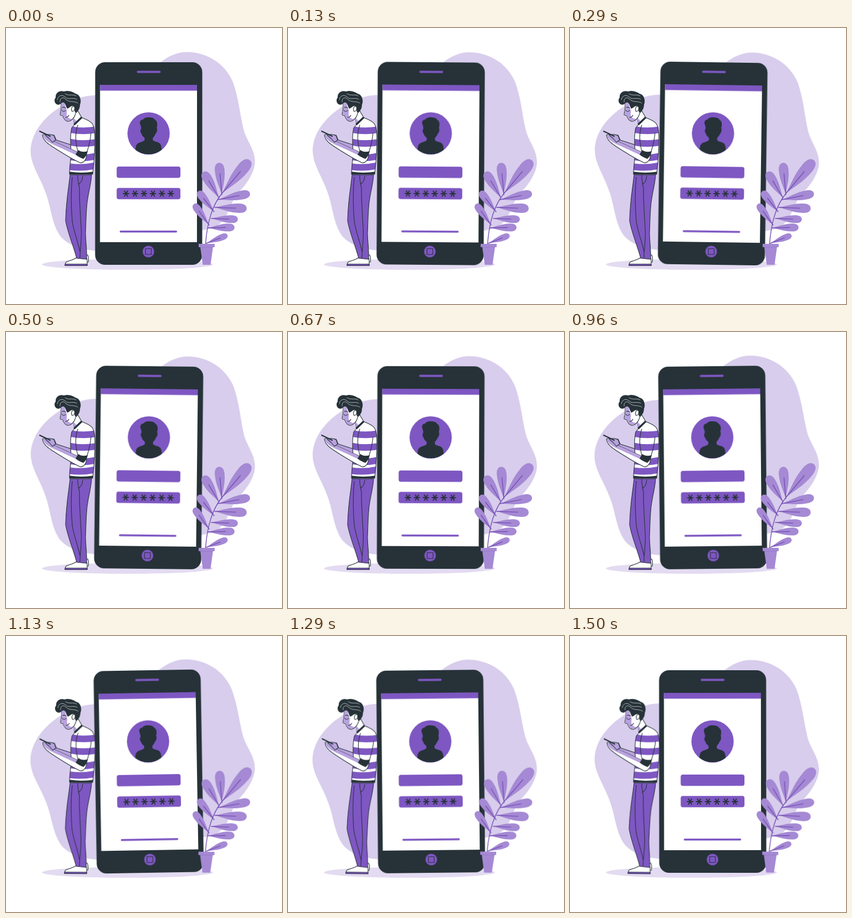
An HTML page without scripts that plays this animation: 500 by 500 pixels, repeating every 1.54 s.

```html
<!DOCTYPE html>
<html lang="en">
<head>
<meta charset="utf-8">
<title>Login illustration</title>
<style>
  html, body { margin: 0; width: 100%; height: 100%; overflow: hidden; background: #fff; }
  svg { display: block; width: 100vw; height: 100vh; }

  .sway { transform-origin: 258.5px 245.5px; animation: sway 1540ms linear infinite; }
  .lean { animation: lean 1540ms linear infinite; }
  #person { transform-origin: 111px 272px; }
  #plant { transform-origin: 391px 333px; }

  @keyframes sway {
    0% { transform: rotate(.02deg); }
    23.8% { transform: rotate(1deg); }
    72.5% { transform: rotate(-1deg); }
    98.5% { transform: rotate(-.02deg); }
    100% { transform: rotate(.02deg); }
  }
  /* starts late and snaps upright when the loop restarts */
  @keyframes lean {
    0%, 65% { transform: rotate(0deg); }
    89.3% { transform: rotate(1deg); }
    100% { transform: rotate(.56deg); }
  }

  .purple { fill: #7e57c2; }
  .dark { fill: #263238; }
  .white { fill: #fff; }
  .mid { fill: #a589d4; }
  .pale { fill: #d8cdec; }
  .skin { fill: #b8a2de; }
  .ink { stroke: #263238; stroke-width: 1.1; stroke-linejoin: round; stroke-linecap: round; }
  .line { fill: none; }
  .vein { fill: none; stroke: #7550b5; stroke-width: 1.4; stroke-linecap: round; vector-effect: non-scaling-stroke; }
  .stripes { fill: none; stroke: #7e57c2; stroke-width: 12; }
  .strand { fill: none; stroke: #cfd5d8; stroke-width: .8; stroke-linecap: round; }
</style>
</head>
<body>
<svg viewBox="0 0 500 500" xmlns="http://www.w3.org/2000/svg">
  <defs>
    <g id="leaf">
      <path class="mid" d="M0 0C25-6 45-18 77-18C93-18 100-10 100 0C100 10 93 18 77 18C45 18 25 6 0 0Z"/>
      <path class="vein" d="M0 0H66"/>
    </g>
    <path id="star" fill="none" stroke="#263238" stroke-width="1.9" stroke-linecap="round" d="M-5 0H5M-2.8-4.8L2.8 4.8M2.8-4.8L-2.8 4.8"/>
    <path id="torso" d="M124 175C129 170 134 164 137 162C143 165 151 167 156 173C161 180 161 191 161 204C161 226 159 247 157 265L115 265C115 249 118 236 118 222C116 207 117 190 119 181Z"/>
    <clipPath id="torsoClip"><use href="#torso"/></clipPath>
  </defs>

  <path class="sway pale" d="M161 122C215 116 236 85 280 62C294 51 310 43.5 328 43.5C364 44 397 64 411 98C421 126 423 150 429 178C434 204 451 217 451 243C450 262 437 281 424 295C408 312 405 332 396 345C386 359 374 364 358 366C300 373 250 405 180 404.5C145 404 117 397 100 379C83 358 82 325 72 299C61 268 44.500 248 44.500 222C46 184 77 153 111 136C128 127 142 123 161 122Z"/>

  <ellipse cx="220" cy="428.300" rx="155" ry="9.800" fill="#e3dbf1"/>

  <g class="sway">
    <rect class="dark" x="161.500" y="62" width="194" height="367" rx="18"/>
    <rect class="purple" x="237" y="77.500" width="43" height="4" rx="2"/>
    <rect class="white" x="170.300" y="103" width="175.700" height="285"/>
    <rect class="purple" x="170.300" y="103" width="175.700" height="10.500"/>
    <circle class="purple" cx="258.300" cy="191" r="38.300"/>
    <path class="dark" d="M244 177C241 171 243 166 248 166C250 162 257 161 261 162C268 162 269 166 272 168C275 172 274 178 273 181C275 184 273 190 271 191.500C269 196 267 198 266 199V203C268 206 274 206 277 208C281 210 281.500 215 282 220.500A38.300 38.300 0 0 1 234.500 220.500C235 214 236 210 241 208C246 206 250 205 251 203V199C248 197 246 194 245.500 191.500C243 189 243 184 245 182Z"/>
    <rect class="purple" x="200.500" y="251" width="115.500" height="20.500" rx="4"/>
    <rect class="purple" x="200.500" y="289.700" width="115.500" height="20.500" rx="4"/>
    <g>
      <use href="#star" x="217.500" y="300"/>
      <use href="#star" x="233.700" y="300"/>
      <use href="#star" x="250" y="300"/>
      <use href="#star" x="266.200" y="300"/>
      <use href="#star" x="282.400" y="300"/>
      <use href="#star" x="298.600" y="300"/>
    </g>
    <rect class="purple" x="206" y="367" width="104" height="3.400" rx="1.700"/>
    <circle class="purple" cx="258" cy="405" r="10.500"/>
    <rect class="ink line" x="252.700" y="399.700" width="10.600" height="10.600"/>
  </g>

  <g id="person" class="lean">
    <!-- shoes and trousers -->
    <path class="white ink" d="M144 412L148 411C150 416 150 420 149 424H143Z"/>
    <path class="white ink" d="M128 416C122 420 113 422 109 424C107 426 107 428 107 430H147V418Z"/>
    <path class="purple ink" d="M107 427.800H147V430.500H107Z"/>
    <path class="purple ink" d="M116 266C114 288 109 310 108 349C111 369 122 394 128 417L146 419C147 402 144 386 144 371C145 350 145 332 147 316C149 298 154 284 155 266Z"/>
    <path class="ink line" d="M130 267C129 278 133 281 133 292C133 318 135 340 136 360C138 380 134 398 134 417M139 268C138 276 137 280 131 283M120 270C117 300 118 325 120 350C123 370 130 385 134 405"/>

    <!-- neck and face -->
    <path class="white ink" d="M121 159L124 174L137 162L130 150Z"/>
    <path class="skin" d="M121 161L124 174L128 169Z"/>
    <path class="white ink" d="M99 133C101 142 100 148 98 156C98 159 101 158 103 159C104 165 109 170 114 169C119 167 123 164 125 158C128 152 128 145 124 139L110 130Z"/>
    <path class="skin" d="M99 133C101 142 100 148 98.500 156C99 158 101 157 103.500 158.500C104 164 109 169 114 168.500L120 165C112 164 109 160 110 154C112 147 105 143 107 133Z"/>
    <path class="ink line" d="M101 149C103 152 106 152 108 149M102 144C104 143 106 143 108 145M108 162C111 162 113 160 114 158"/>
    <path class="dark" d="M95 139C88 139 86 130 90 126C89 118 97 112 105 115C113 112 122 116 126 119C135 121 137 132 134 139C134 146 131 151 125 153L123 142C118 139 114 146 111 146C108 142 108 136 104 135C101 134 99 139 95 139Z"/>
    <path class="white ink" d="M118.500 147C119 142 123 140 124.500 144C125 149 122 152 119.500 151Z"/>
    <path class="strand" d="M93 130C94 122 102 120 107 125C113 131 121 125 128 129M98 134C97 127 103 124 108 129C115 136 122 131 130 136M107 119C114 124 120 119 127 123"/>

    <!-- far arm -->
    <path class="skin ink" d="M119 212L91 203L87 194L74 194L76 200L86 207L119 223Z"/>

    <!-- shirt -->
    <use href="#torso" class="white"/>
    <g clip-path="url(#torsoClip)">
      <path class="stripes" d="M112 183Q138 189 164 184M112 206Q138 212 164 207M112 233Q138 238 164 232M112 251Q138 255 164 249"/>
      <path class="dark" d="M114 260Q136 264 160 260V270H114Z"/>
    </g>
    <use href="#torso" class="ink line"/>
    <path d="M123.500 175L137 162" stroke="#263238" stroke-width="3.500"/>
    <path class="ink line" d="M130 176C125 190 126 208 130 223M154 190C153 204 150 214 147 224"/>

    <!-- near arm, hands and phone -->
    <path class="white ink" d="M146 228C146 238 141 245 134 244C118 237 98 224 84 215C77 210 67 204 66 194C70 191 74 193 78 197L88 206L130 225Z"/>
    <path class="skin" d="M66.500 195C70 192 74 194 78 197L88 206L130 225L129 231L92 214C83 210 70 205 66.500 195Z"/>
    <path class="dark" d="M131 221C136 225 142 225 148 223C147 229 144 234 140 237C135 235 130 233 126 229Z"/>
    <path class="skin ink" d="M71 194C77 192 83 193 87 195L90 203L84 207L78 200Z"/>
    <path d="M61 187L80 196" stroke="#263238" stroke-width="2" stroke-linecap="round"/>
  </g>

  <g id="plant" class="lean">
    <use href="#leaf" transform="translate(391 300) rotate(-50) scale(.79 .6)"/>
    <use href="#leaf" transform="translate(391 302) rotate(-95) scale(.58 .49)"/>
    <use href="#leaf" transform="translate(386 308) rotate(-121) scale(.55 .47)"/>
    <use href="#leaf" transform="translate(377 333) rotate(-128) scale(.47 .4)"/>
    <use href="#leaf" transform="translate(368 357) rotate(-126) scale(.47 .38)"/>
    <use href="#leaf" transform="translate(384 311) rotate(-11) scale(.59 .45)"/>
    <use href="#leaf" transform="translate(378 325) rotate(2) scale(.58 .47)"/>
    <use href="#leaf" transform="translate(372 345) rotate(2) scale(.48 .39)"/>
    <use href="#leaf" transform="translate(366 362) rotate(-1) scale(.48 .4)"/>
    <use href="#leaf" transform="translate(363 390) rotate(-21) scale(.41 .32)"/>
    <path class="vein" d="M361.500 391C364 358 372 323 391 300"/>
    <path class="mid" d="M349 391H378V397H375L370.500 429H356.500L352 397H349Z"/>
    <path d="M352 397H375" stroke="#9676cb" stroke-width=".8"/>
  </g>
</svg>
</body>
</html>
```
